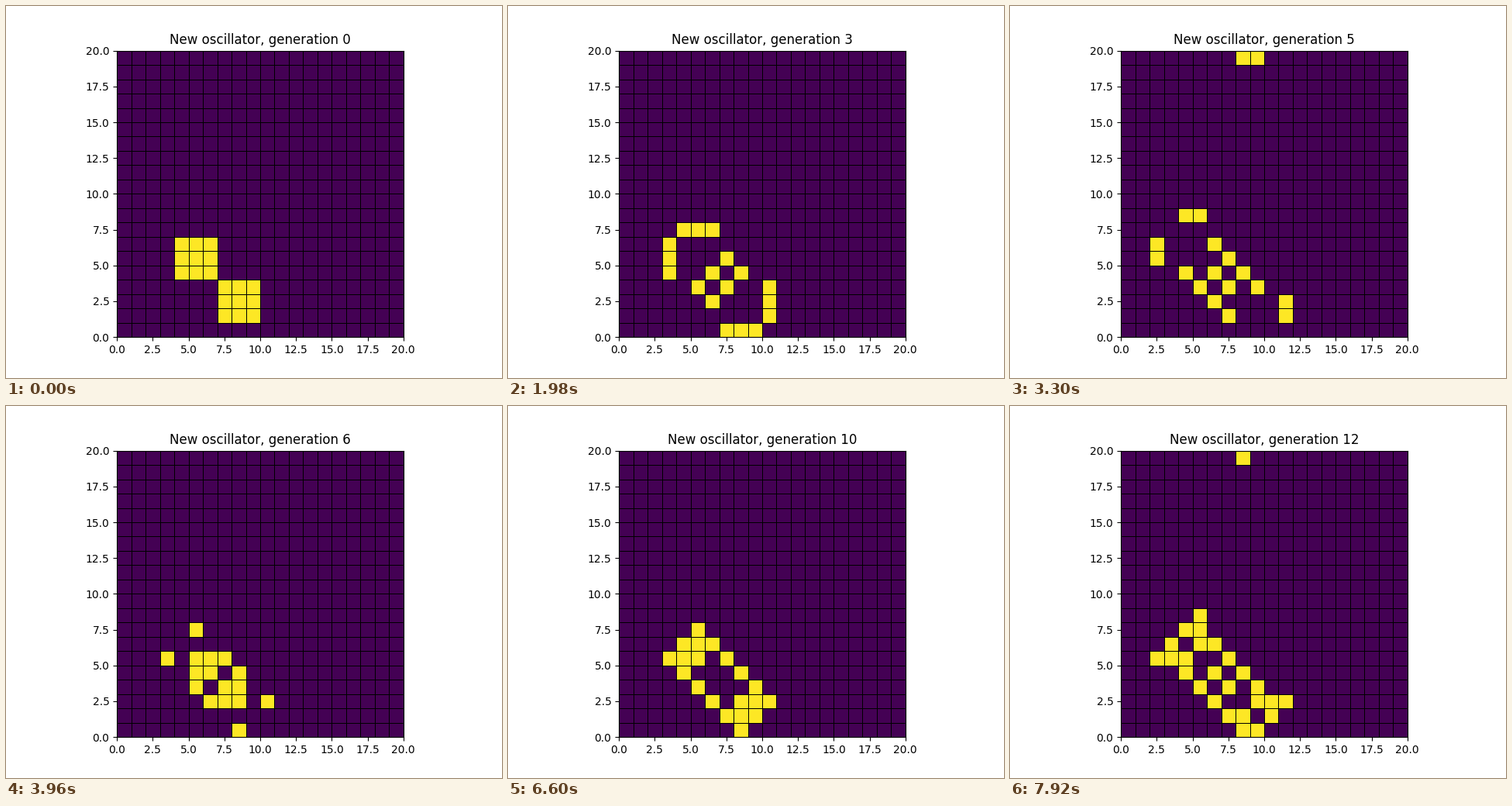
Animation, 640 px wide and 480 px high, one loop 8 s. Source, as a matplotlib script:

```python
import matplotlib.pyplot as plt
import numpy as np
from matplotlib.animation import FuncAnimation

SIZE = 20
LOOP_MS = 8000
STEP_MS = 20
GENERATION_MS = 660


def next_generation(grid):
    """Apply one Game of Life step on a torus."""
    neighbours = sum(
        np.roll(grid, (dy, dx), axis=(0, 1))
        for dy in (-1, 0, 1)
        for dx in (-1, 0, 1)
        if dy or dx
    )
    return ((neighbours == 3) | ((grid == 1) & (neighbours == 2))).astype(int)


def make_history():
    grid = np.zeros((SIZE, SIZE), dtype=int)
    grid[4:7, 4:7] = 1
    grid[1:4, 7:10] = 1
    history = [grid]
    for _ in range((LOOP_MS - 1) // GENERATION_MS):
        history.append(next_generation(history[-1]))
    return history


history = make_history()

fig, ax = plt.subplots(figsize=(6.4, 4.8), dpi=100)
mesh = ax.pcolormesh(history[0], cmap="viridis", vmin=0, vmax=1,
                     edgecolors="k", linewidth=0.5)
ax.set_aspect("equal")
ax.set(xlim=(0, SIZE), ylim=(0, SIZE))
ticks = np.arange(0, SIZE + 0.1, 2.5)
ax.set_xticks(ticks)
ax.set_yticks(ticks)
title = ax.set_title("New oscillator, generation 0")


def update(frame):
    generation = frame * STEP_MS // GENERATION_MS
    mesh.set_array(history[generation])
    title.set_text(f"New oscillator, generation {generation}")
    return mesh, title


animation = FuncAnimation(fig, update, frames=LOOP_MS // STEP_MS,
                          interval=STEP_MS, repeat=True, repeat_delay=0)
plt.show()
```
